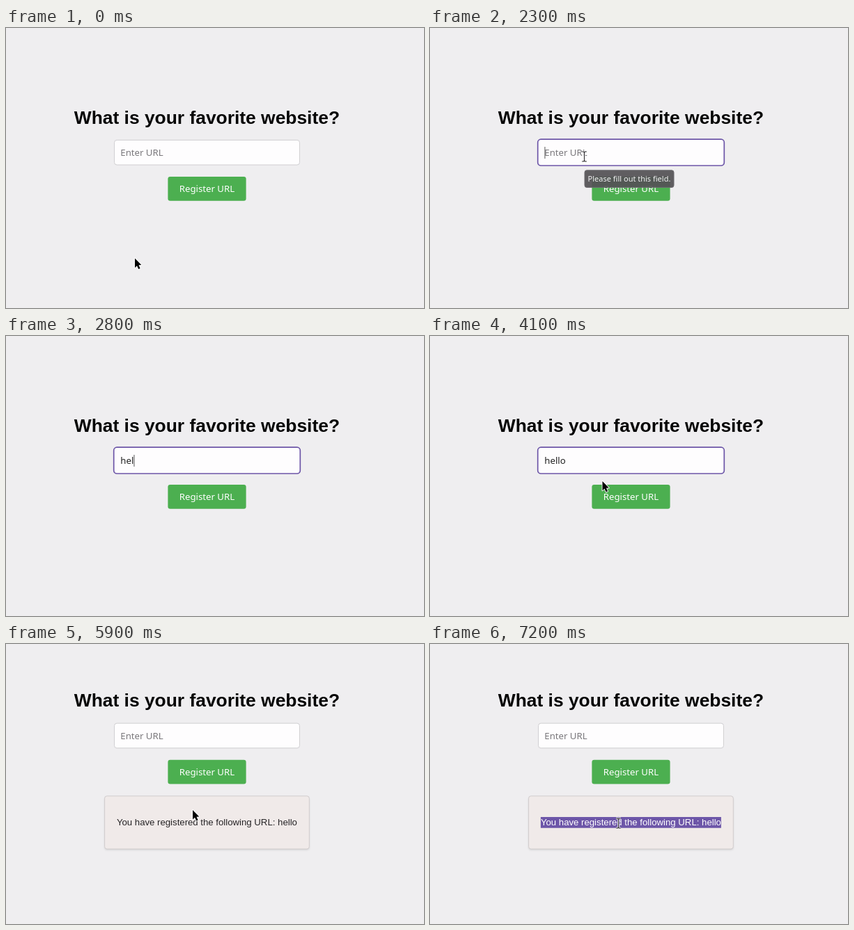
Recreate the animation shown at these times as an HTML page with a canvas. Size 600 px wide and 403 px high, loop 8500 ms.

```html
<!DOCTYPE html>
<html lang="en">
<head>
<meta charset="utf-8">
<title>Favorite website form</title>
<style>
  html, body { margin: 0; width: 100%; height: 100%; overflow: hidden; background: #efeef0; }
  canvas { display: block; }
</style>
</head>
<body>
<canvas id="stage" width="600" height="403"></canvas>
<script>
const ctx = document.getElementById('stage').getContext('2d');
const LOOP = 8500, STEP = 100;
const MID = 288.4;
const SANS = '"Liberation Sans", Arial, sans-serif';
const UI = '"Noto Sans", sans-serif';
const MESSAGE = 'You have registered the following URL: hello';
const MESSAGE_FONT = '13.2px ' + SANS;
const PURPLE = '#6d56a8';

// Event times in ms
const FOCUS = 1500, BLUR = 4700, SUBMIT = 4900;
const KEYS = [2600, 2700, 2800, 2900, 3100];
const SELECT_WORD = 6800, SELECT_ALL = 7000;

// Pointer path: [time, x, y]; arrow tip or I-beam centre
const PATH = [
  [800, 185, 331.5], [900, 188, 310], [1000, 195, 262], [1100, 201, 210], [1200, 201.5, 187],
  [1600, 201.5, 187], [1800, 215, 186], [2000, 221.5, 185],
  [3800, 221.5, 185], [4000, 236, 199], [4200, 259, 219], [4400, 269, 226],
  [5800, 269, 226], [5900, 268, 239], [6000, 269.5, 252], [6100, 270.5, 261],
  [6200, 270.5, 261], [6400, 270.5, 258]
];

const between = (t, a, b) => t >= a && t < b;
const ramp = (t, a, b) => Math.max(0, Math.min(1, (t - a) / (b - a)));
const mix = (a, b, k) => a + (b - a) * k;

function pointerAt(t) {
  let a = PATH[0];
  for (const b of PATH) {
    if (t < b[0]) {
      const k = ramp(t, a[0], b[0]);
      return [mix(a[1], b[1], k), mix(a[2], b[2], k)];
    }
    a = b;
  }
  return [a[1], a[2]];
}

function box(x, y, w, h, r, fill, stroke, line = 1) {
  ctx.beginPath();
  ctx.roundRect(x, y, w, h, r);
  ctx.fillStyle = fill;
  ctx.fill();
  if (stroke) {
    ctx.strokeStyle = stroke;
    ctx.lineWidth = line;
    ctx.stroke();
  }
}

function text(str, x, y, font, color, align = 'left') {
  ctx.font = font;
  ctx.fillStyle = color;
  ctx.textAlign = align;
  ctx.fillText(str, x, y);
}

function arrow(x, y) {
  const pts = [[0, 0], [0, 13.4], [3, 10.7], [5.2, 15.6], [7.6, 14.5], [5.5, 9.8], [9.3, 9.6]];
  ctx.beginPath();
  for (const [dx, dy] of pts) ctx.lineTo(x + dx, y + dy);
  ctx.closePath();
  ctx.lineJoin = 'round';
  ctx.strokeStyle = '#fff';
  ctx.lineWidth = 1.8;
  ctx.stroke();
  ctx.fillStyle = '#000';
  ctx.fill();
}

function beam(x, y) {
  ctx.beginPath();
  for (const s of [-1, 1]) {
    ctx.moveTo(x - 3.4, y + s * 7);
    ctx.lineTo(x - 1, y + s * 7);
    ctx.lineTo(x, y + s * 6);
    ctx.lineTo(x + 1, y + s * 7);
    ctx.lineTo(x + 3.4, y + s * 7);
  }
  ctx.moveTo(x, y - 6);
  ctx.lineTo(x, y + 6);
  ctx.strokeStyle = 'rgba(255,255,255,.9)';
  ctx.lineWidth = 2.8;
  ctx.stroke();
  ctx.strokeStyle = '#2c2a2e';
  ctx.lineWidth = 1.1;
  ctx.stroke();
}

function drawForm(t) {
  const sent = t >= SUBMIT;
  const focused = between(t, FOCUS, BLUR);
  const typed = sent ? '' : 'hello'.slice(0, KEYS.filter(k => t >= k).length);
  ctx.save();
  if (sent) ctx.translate(0, -47.2);

  text('What is your favorite website?', MID, 137.5, 'bold 26.4px ' + SANS, '#050505', 'center');

  if (focused) box(154.7, 160.2, 267.6, 37.8, 4.5, '#fefdfe', PURPLE, 1.7);
  else box(155.6, 161.3, 265.8, 35.7, 3.5, '#fefdfe', '#cfced1');
  text(typed || 'Enter URL', 164.3, 183.9, '13.2px ' + UI, typed ? '#222' : '#7a787c');

  if (focused && !between(t, 3800, 4400)) {
    const w = ctx.measureText(typed).width;
    ctx.fillStyle = '#444';
    ctx.fillRect(164.5 + w, 171, 0.9, 17);
  }

  const hover = sent ? 1 - ramp(t, 4800, 5000) : ramp(t, 4200, 4600);
  const green = [[76, 62], [175, 142], [80, 65]].map(([a, b]) => Math.round(mix(a, b, hover)));
  box(232.4, 214, 112.2, 34.8, 3.3, `rgb(${green})`);
  text('Register URL', MID, 236.1, '13.2px ' + UI, '#fff', 'center');
  ctx.restore();
}

function drawTooltip(t) {
  const alpha = ramp(t, 2100, 2300) * (1 - ramp(t, 2500, 2700));
  if (!alpha) return;
  ctx.save();
  ctx.globalAlpha = alpha;
  box(222, 204.8, 128, 24.6, 3, 'rgba(84,82,86,.93)', '#6d6b6f');
  text('Please fill out this field.', 286, 220.8, '11px ' + UI, '#f4f3f5', 'center');
  ctx.restore();
}

function drawMessage(t) {
  if (t < SUBMIT) return;
  ctx.save();
  ctx.shadowColor = 'rgba(0,0,0,.12)';
  ctx.shadowBlur = 3;
  ctx.shadowOffsetY = 1.6;
  box(141.6, 218.8, 293.7, 76.2, 3.3, '#f0eae9');
  ctx.restore();
  box(141.6, 218.8, 293.7, 76.2, 3.3, '#f0eae9', '#d0cccd');

  ctx.font = MESSAGE_FONT;
  ctx.textAlign = 'left';
  const width = s => ctx.measureText(s).width;
  const left = MID - width(MESSAGE) / 2;
  text(MESSAGE, left, 261, MESSAGE_FONT, '#262426');
  if (t < SELECT_WORD) return;

  const before = width('You have ');
  const whole = t >= SELECT_ALL;
  ctx.save();
  ctx.beginPath();
  ctx.rect(whole ? left : left + before, 249, whole ? width(MESSAGE) : width('registered'), 15.8);
  ctx.fillStyle = PURPLE;
  ctx.fill();
  ctx.clip();
  text(MESSAGE, left, 261, MESSAGE_FONT, '#fff');
  ctx.restore();
}

function drawPointer(t) {
  if (between(t, KEYS[0], 3800)) return;
  const [x, y] = pointerAt(t);
  const overInput = t < SUBMIT && between(y, 161, 197);
  const overText = t >= SUBMIT && y > 248;
  (overInput || overText ? beam : arrow)(x, y);
}

function frame() {
  const t = Math.floor((performance.now() % LOOP) / STEP) * STEP;
  ctx.fillStyle = '#efeef0';
  ctx.fillRect(0, 0, 600, 403);
  drawForm(t);
  drawTooltip(t);
  drawMessage(t);
  drawPointer(t);
  requestAnimationFrame(frame);
}
frame();
</script>
</body>
</html>
```
